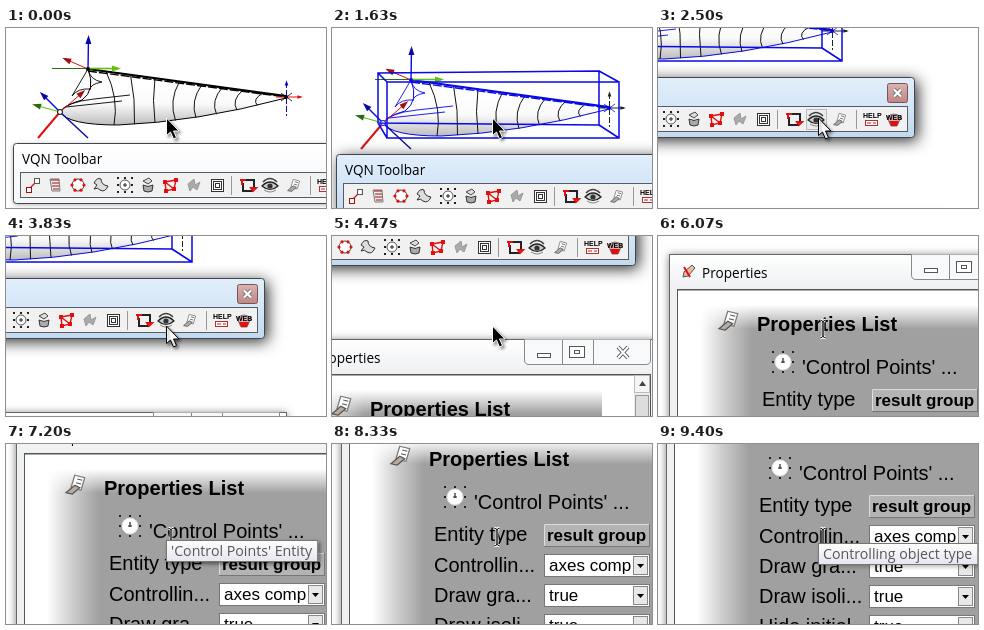
An HTML page with a canvas for the animation above (9.47 s loop, 320 px wide and 180 px high).

```html
<!DOCTYPE html>
<html lang="en">
<head>
<meta charset="utf-8">
<title>Toolbar walkthrough</title>
<style>
html, body { margin: 0; width: 100%; height: 100%; overflow: hidden; background: #fff; }
canvas { display: block; width: 320px; height: 180px; }
</style>
</head>
<body>
<canvas id="stage" width="320" height="180"></canvas>
<script>
const g = document.getElementById('stage').getContext('2d');
const LOOP = 9470;
const SANS = '"Liberation Sans", Arial, sans-serif';
const UI = '"Open Sans", "Noto Sans", sans-serif';
const RED = '#e01010', BLUE = '#0808e8', GREEN = '#62c010', INK = '#222';
const DARK_RED = '#a01010', DARK_BLUE = '#0808a8', DARK_GREEN = '#2c6a10';

// Camera stops: time, x, y. The view follows the pointer.
const stops = [
  [0, 0, 0], [200, 0, 0], [430, 2, -8], [570, 2, -8], [670, 3, -11], [1600, 3, -11],
  [2550, 107, 67], [3680, 107, 67], [4470, 59, 146], [5700, -2, 231], [6060, -2, 231],
  [6970, -1, 275], [7270, -1, 275], [7930, 0, 304], [8290, 0, 304], [9130, 1, 333], [LOOP, 1, 333]
];
const tips = [
  [7050, 7270, 107, "'Control Points' Entity"],
  [8100, 8300, 110, 'Type of selected entity'],
  [9400, LOOP, 110, 'Controlling object type']
];

const clamp = v => Math.max(0, Math.min(1, v));

function slope(i, axis) {
  const a = stops[i - 1], b = stops[i], c = stops[i + 1];
  if (!a || !c || (b[axis] - a[axis]) * (c[axis] - b[axis]) <= 0) return 0;
  return (c[axis] - a[axis]) / (c[0] - a[0]);
}

function camera(t, axis) {
  const i = Math.max(0, stops.findIndex(s => s[0] > t) - 1);
  const a = stops[i], b = stops[i + 1], d = b[0] - a[0], u = (t - a[0]) / d, v = 1 - u;
  return Math.round(a[axis] * v * v * (1 + 2 * u) + b[axis] * u * u * (3 - 2 * u)
    + d * u * v * (slope(i, axis) * v - slope(i + 1, axis) * u));
}

function rect(x, y, w, h, fill, stroke) {
  if (fill) { g.fillStyle = fill; g.fillRect(x, y, w, h); }
  if (stroke) { g.strokeStyle = stroke; g.lineWidth = 1; g.strokeRect(x + .5, y + .5, w - 1, h - 1); }
}

function path(d, stroke, width = 1, fill) {
  const p = new Path2D(d);
  if (fill) { g.fillStyle = fill; g.fill(p); }
  if (stroke) { g.strokeStyle = stroke; g.lineWidth = width; g.stroke(p); }
}

function dot(x, y, r, fill, stroke) {
  g.beginPath();
  g.arc(x, y, r, 0, 7);
  if (fill) { g.fillStyle = fill; g.fill(); }
  if (stroke) { g.strokeStyle = stroke; g.lineWidth = 1; g.stroke(); }
}

function text(s, x, y, font, color = '#000') {
  g.font = font;
  g.fillStyle = color;
  g.textBaseline = 'alphabetic';
  g.fillText(s, x, y);
}

function gradient(x0, y0, x1, y1, ...colors) {
  const f = g.createLinearGradient(x0, y0, x1, y1);
  colors.forEach((c, i) => f.addColorStop(i / (colors.length - 1), c));
  return f;
}

function shadowed(color, blur, dx, dy, draw) {
  g.save();
  Object.assign(g, { shadowColor: color, shadowBlur: blur, shadowOffsetX: dx, shadowOffsetY: dy });
  draw();
  g.restore();
}

function arrow(x0, y0, x1, y1, color, width = 1.4, head = color, size = 1) {
  path(`M${x0} ${y0}L${x1} ${y1}`, color, width);
  g.save();
  g.translate(x1, y1);
  g.rotate(Math.atan2(y1 - y0, x1 - x0));
  g.scale(size, size);
  path('M3 0L-6 -3V3Z', null, 1, head);
  g.restore();
}

// Cross sections of the tapered body; they bend the other way towards the tip.
function sections() {
  for (let i = 0; i < 8; i++) {
    const x = 108 + i * 20.5, u = clamp((x - 112) / 168);
    const topX = x + Math.min(6, i * 4 - 8), top = 41 + (topX - 82) * .136;
    const bottom = 97 - 6 * u - 21 * u * u;
    const bend = (x + topX) / 2 + Math.max(-9, 9 - i * 6);
    path(`M${topX} ${top}Q${bend} ${(top + bottom) / 2} ${x} ${bottom}`, '#111');
  }
}

function model(selected) {
  const edge = selected ? BLUE : '#000';
  path('M82 41L280 68.500L280 70Q190 94 112 97Q62 97 54 84Q58 77 76 72Q90 62 82 41Z',
    edge, 1, gradient(0, 55, 0, 97, '#fff', '#fafafa', '#bcbcbc'));
  sections();
  path('M82 41L280 68', edge, 2.2);
  g.setLineDash([9, 2]);
  path('M82 43L180 56L280 69', edge, 1.4);
  g.setLineDash([]);
  path('M54 84Q60 74 88 71L124 67M60 79L116 73M82 41Q84 52 96 54Q84 56 84 62M66 68Q72 60 84 61M82 41L66 68', edge, .9);

  path('M46 40.500H82', DARK_GREEN);
  arrow(82, 40.5, 112, 40.5, GREEN, 1.6);
  arrow(82, 41, 82.5, 10, BLUE, 1.4, DARK_BLUE);
  arrow(82, 41, 59, 31, RED, 1, DARK_RED);
  arrow(54, 84, 77, 64, RED, 1, DARK_RED);
  arrow(54, 84, 36, 66, BLUE, 1.4, DARK_BLUE);
  arrow(54, 84, 29, 77, GREEN, 1.2, DARK_GREEN);
  path('M54 84L82 110', DARK_BLUE, 1.4);
  path('M54 84L32 110', RED, 2);
  dot(54, 84, 2.5, '#fff', edge);
  dot(82, 41, 2, edge);

  const tipBlue = selected ? INK : DARK_BLUE, tipRed = selected ? INK : RED;
  g.setLineDash([6, 2]);
  path('M280.500 54V88', tipBlue);
  g.setLineDash([]);
  arrow(280.5, 60, 280.5, 54, tipBlue, 1, tipBlue, .6);
  arrow(270, 69, 295, 69, tipRed, 1, tipRed, .6);
  path('M275 65L286 73M275 73L286 65', edge, .8);
  dot(280, 69, 2, edge);

  if (selected) {
    path('M49 34L270 32V86L49 84ZM58 43H290V99H58ZM49 34L58 43M270 32L290 43M270 86L290 99M49 84L58 99', BLUE, 1.5);
  }
}

const corners = (r, color) => {
  for (const [x, y] of [[-1, -1], [0, -1], [1, -1], [1, 0], [1, 1], [0, 1], [-1, 1], [-1, 0]])
    rect(x * r - 1, y * r - 1, 2, 2, color);
};

const sheet = () => {
  path('M-1 -7L7 -5L4 5L-4 3Z', '#777', 1, '#fff');
  path('M1 -4L5 -3M0 -1L4 0', '#555');
  path('M-8 7L-1 1L3 3L-3 8Z', '#555', 1, '#b9aaa0');
};

const gear = () => {
  corners(7, INK);
  dot(0, 0, 5, '#fff', '#555');
  path('M0 -2V2M-2 0H2', INK);
};

// Toolbar buttons: centre x and drawing around the origin.
const icons = [
  [27, () => { path('M-5 5L1 -1L5 -5', RED, 1.2); rect(-7, 2, 6, 6, '#fff', DARK_RED); rect(1, -7, 6, 6, '#fff', '#555'); }],
  [49, () => { path('M-5 -6H4L5 6H-3Z', '#777', 1, '#eee'); path('M-4 -5H4M-3 -2H4M-3 1H4M-2 4H4', DARK_RED); }],
  [72, () => { dot(0, 0, 6, '#fff', '#444'); for (let a = 0; a < 6; a++) dot(6 * Math.cos(a * 1.047), 6 * Math.sin(a * 1.047), 1.6, RED); }],
  [95, () => path('M-7 -2Q-4 -8 0 -6Q0 0 7 1Q4 8 -1 5Q-3 2 -7 4L-4 0Z', '#333', 1, '#ddd')],
  [119, gear],
  [142, () => { path('M-5 0Q0 3 5 0L4 6Q0 8 -4 6Z', '#333', 1, '#aaa'); path('M-5 -4L1 -7L4 -4L0 -1Z', '#444', 1, '#ddd'); }],
  [165, () => { path('M-6 -3L5 -5L3 4L-5 6ZM-6 -3L3 4', RED, 1.4); for (const [x, y] of [[-6, -3], [5, -5], [3, 4], [-5, 6]]) rect(x - 2, y - 2, 4, 4, RED); }],
  [188, () => path('M-6 -1L0 -6L1 0L6 -3L3 5L-1 2L-4 6Z', '#999', 1, '#aaa')],
  [211, () => { for (const r of [6, 4, 2]) rect(-r, -r, r * 2 + 1, r * 2 + 1, '#fff', '#333'); }],
  [242, () => { path('M-5 -5H6V3M5 6H-5V-2', INK, 2); path('M-8 -5H-2M-6 -5V0M3 3H8L5 6Z', RED, 2); }],
  [264, () => {
    path('M-8 1Q0 -7 8 1Q0 8 -8 1Z', INK, 1.2, '#ccc');
    path('M-7 -3Q0 -10 7 -3', '#444', 1.5);
    path('M-6 5Q0 9 6 5', '#888');
    dot(0, 1, 2.6, '#333');
  }],
  [288, () => { g.scale(.8, .8); sheet(); }],
  [319, () => { text('HELP', -8, -1, `bold 7px ${SANS}`); rect(-6, 1, 13, 6, '#fff', '#a33'); path('M-4 4H0M2 4H5', RED); }],
  [342, () => { path('M-7 -2Q0 -8 7 -2L3 7H-3Z', '#777', 1, '#d8b0b0'); path('M-5 2H5L3 7H-3Z', null, 1, RED); text('WEB', -8, 1, `bold 7px ${SANS}`); }]
];

function toolbar(active, hover) {
  const glass = active
    ? gradient(0, 115, 0, 175, '#e2eefa', '#d4e6f8', '#c3d9ee')
    : gradient(0, 115, 0, 175, '#fff', '#f4f6f8');
  shadowed(active ? 'rgba(0,0,0,.85)' : 'rgba(0,0,0,.35)', active ? 15 : 5, active ? 3 : 0, active ? 3 : 1,
    () => { g.beginPath(); g.roundRect(7.5, 115.5, 355, 60, 3); g.fillStyle = '#dfeaf4'; g.fill(); });
  g.fillStyle = glass;
  g.fill();
  g.strokeStyle = '#40464e';
  g.lineWidth = 1;
  g.stroke();
  text('VQN Toolbar', 16, 136, `13.6px ${UI}`);
  g.beginPath();
  g.roundRect(335.5, 121.5, 20, 19, 2);
  g.fillStyle = gradient(0, 121, 0, 141, '#dcb4b4', '#c08484');
  g.fill();
  g.strokeStyle = '#7a5555';
  g.stroke();
  path('M342 127.500L349 134.500M349 127.500L342 134.500', '#777', 4);
  path('M342 127.500L349 134.500M349 127.500L342 134.500', '#fff', 2.2);
  rect(14, 144, 342, 26, '#f1f1f1', '#555c64');
  for (const x of [225, 304]) rect(x, 148, 1, 19, '#999');
  if (hover) rect(254, 147, 21, 21, '#ececec', '#bbb');
  for (const [x, draw] of icons) {
    g.save();
    g.translate(x, 157);
    draw();
    g.restore();
  }
}

function row(label, value, y) {
  text(label, 102, y + 7, `20px ${SANS}`);
  rect(212, y - 11, 106, 23, '#fff', '#777');
  g.save();
  g.beginPath();
  g.rect(213, y - 11, 87, 23);
  g.clip();
  text(value, 217, y + 6, `17px ${SANS}`);
  g.restore();
  rect(301, y - 9, 15, 19, '#e8e8e8', '#888');
  path(`M305 ${y - 1}H312L308.5 ${y + 3}Z`, null, 1, '#000');
}

function properties() {
  shadowed('rgba(0,0,0,.5)', 8, 0, 1, () => rect(9, 249, 376, 400, '#f3f5f7'));
  rect(9, 249, 376, 400, gradient(0, 249, 0, 284, '#fff', '#eef0f2'), '#666');
  path('M23 272L24 267L32 260L35 263L28 271Z', '#555', 1, '#e9b8a0');
  path('M24 262L30 272', RED, 2);
  text('Properties', 42, 273, `13.6px ${UI}`);

  path('M251.5 249.5V270Q251.5 274.5 256 274.5H373Q377.5 274.5 377.5 270V249.5M289.5 250V274M320.5 250V274', '#888', 1, '#f8f9fa');
  rect(264, 263, 14, 5, '#fff', '#555');
  rect(296, 256, 16, 12, '#fff', '#555');
  rect(301, 260, 6, 4, '#fff', '#555');
  path('M345 257L355 268M355 257L345 268', '#555', 4);
  path('M345 257L355 268M355 257L345 268', '#fff', 2);

  rect(17, 284, 361, 400, '#fff', '#555');
  rect(18, 285, 359, 1, '#aaa');
  rect(40, 300, 289, 350, gradient(40, 0, 92, 0, '#fff', '#ccc', '#a0a0a0'));
  rect(40, 300, 289, 24, gradient(0, 300, 0, 324, '#fff', 'rgba(255,255,255,0)'));
  rect(361, 285, 16, 365, '#ededed');
  rect(361, 285, 16, 18, '#f5f5f5', '#bbb');
  path('M366 296H373L369.5 291Z', null, 1, '#444');
  rect(362, 305, 14, 90, '#ddd', '#999');

  g.save();
  g.translate(69, 315);
  g.scale(1.25, 1.25);
  sheet();
  g.restore();
  text('Properties List', 97, 326, `bold 20px ${SANS}`);
  g.save();
  g.translate(123, 357);
  dot(0, 0, 8, '#fff', '#ddd');
  corners(10, INK);
  path('M0 -4V1M-2 0H2', INK, 1.2);
  g.restore();
  text("'Control Points' ...", 142, 369, `20px ${SANS}`);

  text('Entity type', 102, 401, `20px ${SANS}`);
  rect(212, 384, 106, 23, '#b4b4b4', '#777');
  path('M212.5 406V384.5H317', '#ddd');
  text('result group', 215, 401, `bold 17px ${SANS}`);
  row('Controllin...', 'axes component', 425);
  row('Draw gra...', 'true', 455);
  row('Draw isoli...', 'true', 485);
  row('Hide initial...', 'true', 515);
}

function pointer(worldY) {
  if (worldY > 305) {
    const beam = 'M162 84Q165 84 165 87V99Q165 102 162 102M168 84Q165 84 165 87V99Q165 102 168 102';
    path(beam, '#fff', 2.6);
    path(beam, '#222', 1);
    return;
  }
  const light = worldY > 249 || (worldY > 115 && worldY < 177);
  shadowed('rgba(0,0,0,.4)', 3, 2, 2, () =>
    path('M160.500 90V107.500L164.500 104L167.500 111L170.500 109.500L167.500 103H173Z',
      light ? '#000' : '#fff', 1, light ? '#fff' : '#000'));
}

function tooltip([start, end, y, label], t) {
  if (t < start || t >= end) return;
  g.globalAlpha = clamp((t - start + 60) / 120);
  g.font = `14.2px ${UI}`;
  const w = g.measureText(label).width + 11;
  shadowed('rgba(0,0,0,.5)', 4, 2, 2, () => rect(160, y - 11, w, 22, '#fff'));
  g.globalAlpha = 1;
  rect(160, y - 11, w, 22, gradient(0, y - 11, 0, y + 11, '#fff', '#e4e5f0'), '#767676');
  text(label, 165, y + 5, g.font, '#575757');
}

function render(now) {
  const t = now % LOOP, x = camera(t, 1), y = camera(t, 2);
  rect(0, 0, 320, 180, '#fff');
  g.save();
  g.translate(-x, -y);
  model(t >= 970);
  toolbar(t >= 1100, t > 2350 && t < 3750);
  if (t > 2460) {
    g.globalAlpha = clamp((t - 2460) / 280);
    properties();
  }
  g.restore();
  pointer(y + 92);
  tips.forEach(tip => tooltip(tip, t));
  requestAnimationFrame(() => render(performance.now()));
}
render(performance.now());
</script>
</body>
</html>
```
